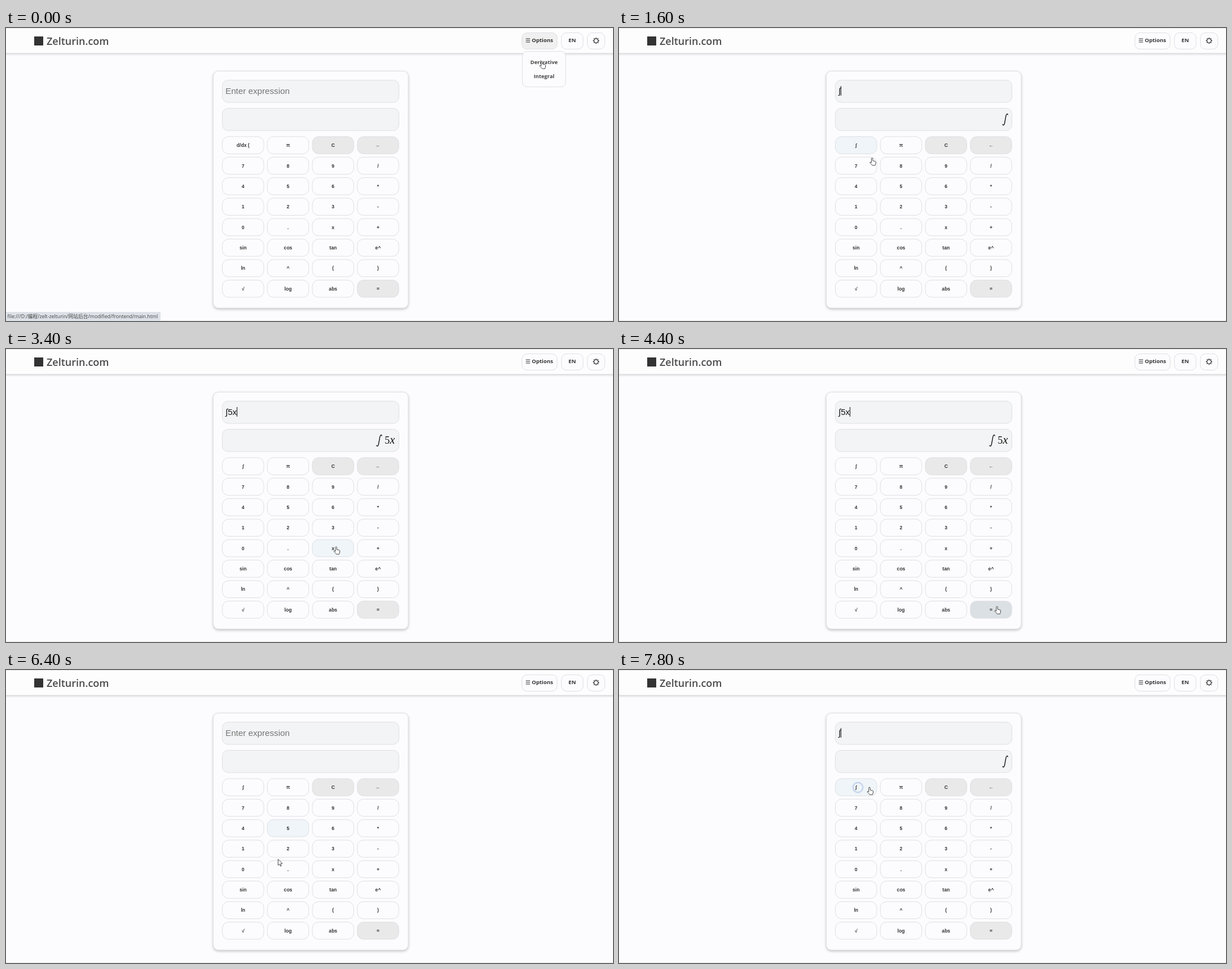
An HTML page with a canvas for the animation above (8 s loop, 1076 by 520 pixels).

```html
<!DOCTYPE html>
<html lang="en">
<head>
<meta charset="utf-8">
<title>Calculator</title>
<style>
  html, body { margin: 0; width: 100%; height: 100%; overflow: hidden; background: #fcfcfe; }
  canvas { display: block; width: 100%; height: 100%; }
</style>
</head>
<body>
<canvas id="stage" width="1076" height="520"></canvas>
<script>
const ctx = document.getElementById('stage').getContext('2d');
const LOOP = 8000, STEP = 200;
const UI = '"Open Sans", "Noto Sans", "Noto Sans CJK SC", sans-serif';
const SANS = '"Liberation Sans", Arial, sans-serif';
const SERIF = '"Liberation Serif", "Times New Roman", serif';
const PAGE = '#fcfcfe', BORDER = '#dfdfe5', INK = '#333';

const STATUS = ['file:', '', '', 'D:', '编程', 'zelt-zelturin', '网站后台',
  'modified', 'frontend', 'main.html'].join('/');

const KEYS = [
  'd/dx (', 'π', 'C', '←',
  '7', '8', '9', '/',
  '4', '5', '6', '*',
  '1', '2', '3', '-',
  '0', '.', 'x', '+',
  'sin', 'cos', 'tan', 'e^',
  'ln', '^', '(', ')',
  '√', 'log', 'abs', '='
];
const GREY = ['C', '←', '='];

// Pointer tip: time, x, y
const TRACK = [
  [0, 950, 59], [400, 953, 81], [800, 682, 170], [1200, 424, 206], [1400, 424, 207],
  [2000, 498, 278], [2200, 566, 284], [2400, 609, 298], [2800, 583, 348], [3600, 586, 352],
  [4200, 667, 456], [4400, 670, 457], [4600, 672, 457], [4800, 783, 418], [5000, 784, 372],
  [5200, 612, 216], [5600, 571, 211], [6000, 571, 211], [6600, 438, 398], [6800, 424, 422],
  [7000, 440, 421], [7200, 480, 417], [7400, 458, 318], [7600, 424, 207], [7800, 444, 208]
];

// Typed expression by time
const TYPED = [[0, ''], [1400, '∫'], [2000, '∫5'], [3000, '∫5x'], [6000, ''], [7600, '∫']];
const PAGE_SWITCH = 600, SOLVED = 4600, CLEARED = 6000, RING = 7800;

const lastBefore = (list, t) => list.filter(k => k[0] <= t).pop();

function pointerAt(t) {
  const a = lastBefore(TRACK, t);
  const b = TRACK.find(k => k[0] > t) || a;
  const u = a === b ? 0 : (t - a[0]) / (b[0] - a[0]);
  return [a[1] + (b[1] - a[1]) * u, a[2] + (b[2] - a[2]) * u];
}

const keyBox = i => [383.5 + (i % 4) * 79.75, 192.8 + Math.floor(i / 4) * 36.37, 73.5, 30.5];

function keyUnder(t) {
  if (t < 0) return -1;
  const [px, py] = pointerAt(t);
  return KEYS.findIndex((_, i) => {
    const [x, y, w, h] = keyBox(i);
    return px >= x && px <= x + w && py >= y && py <= y + h;
  });
}

function text(str, x, y, font, color = INK, align = 'left') {
  ctx.font = font;
  ctx.fillStyle = color;
  ctx.textAlign = align;
  ctx.fillText(str, x, y);
}

function rect(x, y, w, h, color) {
  ctx.fillStyle = color;
  ctx.fillRect(x, y, w, h);
}

function panel(x, y, w, h, r, fill, shadow) {
  ctx.beginPath();
  ctx.roundRect(x, y, w, h, r);
  ctx.save();
  if (shadow) {
    ctx.shadowColor = `rgba(0,0,0,${shadow})`;
    ctx.shadowBlur = 5;
    ctx.shadowOffsetY = 2;
  }
  ctx.fillStyle = fill;
  ctx.fill();
  ctx.restore();
  ctx.strokeStyle = BORDER;
  ctx.lineWidth = 1;
  ctx.stroke();
}

function shape(d, x, y, fill, stroke, width) {
  const path = new Path2D(d);
  ctx.save();
  ctx.translate(x, y);
  if (fill) {
    ctx.fillStyle = fill;
    ctx.fill(path);
  }
  ctx.strokeStyle = stroke;
  ctx.lineWidth = width;
  ctx.lineCap = ctx.lineJoin = 'round';
  ctx.stroke(path);
  ctx.restore();
}

function drawGear(x, y) {
  ctx.strokeStyle = INK;
  ctx.lineWidth = 1.2;
  ctx.beginPath();
  ctx.arc(x, y, 3.7, 0, 7);
  ctx.stroke();
  ctx.lineWidth = 1.5;
  ctx.beginPath();
  for (let i = 0; i < 8; i++) {
    const a = i * Math.PI / 4, c = Math.cos(a), s = Math.sin(a);
    ctx.moveTo(x + c * 4, y + s * 4);
    ctx.lineTo(x + c * 5.6, y + s * 5.6);
  }
  ctx.stroke();
}

function drawHeader(menuOpen) {
  ctx.save();
  ctx.shadowColor = 'rgba(0,0,0,0.2)';
  ctx.shadowBlur = 4;
  ctx.shadowOffsetY = 1.5;
  rect(-10, 0, 1096, 44.5, '#fdfdfe');
  ctx.restore();
  rect(0, 0, 1076, 1, '#e6e6e8');
  rect(50, 15, 16, 16, INK);
  text('Zelturin.com', 72, 30, `600 18px ${UI}`, '#4a4a4a');

  const bold = `bold 9.6px ${UI}`;
  panel(914.5, 8.5, 62.5, 29, 9, menuOpen ? '#f0f0f0' : PAGE);
  for (const y of [18.5, 21.5, 24.5]) rect(921.5, y, 7.5, 1, INK);
  text('Options', 932, 25.2, bold);
  panel(984.5, 8.5, 38.5, 29, 9, PAGE);
  text('EN', 1003.7, 25.2, bold, INK, 'center');
  panel(1030.5, 8.5, 31, 29, 9, PAGE);
  drawGear(1046, 22.5);

  if (menuOpen) {
    panel(915.5, 41.5, 76.5, 63, 8, PAGE);
    const item = `bold 9.4px ${UI}`;
    text('Derivative', 953.8, 64, item, '#444', 'center');
    text('Integral', 953.8, 89.4, item, '#444', 'center');
  }
}

const integral = x => shape(
  'M.6,8.8C1.5,11 3.3,10.2 4,6.2L6.1,-5.4C6.9,-10.2 9,-11 9.6,-8.6',
  x, 162.4, null, '#111', 1.4);

function drawMath(expr, solved) {
  const roman = `18px ${SERIF}`, italic = `italic 20px ${SERIF}`;
  const put = (s, x, font = roman, y = 168) => text(s, x, y, font, '#111');
  if (solved) {
    put('(', 614.8);
    put('5', 621.2);
    put('/', 632);
    put('2', 639);
    put(')', 648.8);
    put('∗', 659.5);
    put('x', 673, italic);
    put('2', 683.6, `12.6px ${SERIF}`, 161);
  } else if (expr === '∫') {
    integral(679.6);
  } else if (expr === '∫5') {
    integral(667);
    put('5', 681.4);
  } else if (expr === '∫5x') {
    integral(656.5);
    put('5', 671.2);
    put('x', 680.4, italic);
  }
}

function drawFields(expr, solved) {
  panel(383.5, 92.5, 313, 39.5, 10, '#f2f4f5');
  panel(383.5, 142.5, 313, 39.5, 10, '#f2f4f5');
  const font = `15.2px ${SANS}`;
  if (expr) {
    text(expr, 389, 117, font, '#111');
    if (!solved) rect(Math.round(389 + ctx.measureText(expr).width), 103, 1, 17, '#111');
  } else {
    text('Enter expression', 389, 117, font, '#757575');
  }
  drawMath(expr, solved);
}

function keyColor(label, i, t) {
  const grey = GREY.includes(label);
  // The hover tint trails the pointer by one step
  if (keyUnder(t - STEP) !== i) return grey ? '#e9e9e9' : PAGE;
  if (!grey) return '#eff5f8';
  return keyUnder(t - 2 * STEP) === i ? '#d0d4d9' : '#dae0e3';
}

function drawKeys(t) {
  KEYS.forEach((key, i) => {
    const [x, y, w, h] = keyBox(i);
    const label = i === 0 && t >= PAGE_SWITCH ? '∫' : key;
    panel(x, y, w, h, 11, keyColor(key, i, t));
    text(label, x + w / 2, y + 18.4, `bold 8.6px ${SANS}`, INK, 'center');
  });
}

function drawRing(x, y) {
  ctx.beginPath();
  ctx.arc(x, y, 8.8, 0, 7);
  ctx.strokeStyle = 'rgba(185,200,235,0.75)';
  ctx.lineWidth = 2.4;
  ctx.stroke();
}

function drawPointer(t) {
  const [x, y] = pointerAt(t);
  if (t < PAGE_SWITCH || keyUnder(t) >= 0) {
    shape('M-1.2,8V1.2Q-1.2,0 0,0Q1.2,0 1.2,1.2V5L5.3,5.9Q6.8,6.4 6.6,8L6,11.2L5.3,13.2H.4L-1,11.4' +
      'L-3.9,8.4Q-3.9,6.8 -2.4,7.2Z', x, y, '#fff', '#333', 0.9);
  } else {
    shape('M0,.5V11L2.5,8.9L4.2,12.6L5.8,11.9L4.2,8.3L7.2,7.9Z', x, y, '#fff', '#333', 0.9);
  }
}

function draw(t) {
  const menuOpen = t < PAGE_SWITCH;
  const solved = t >= SOLVED && t < CLEARED;
  rect(0, 0, 1076, 520, PAGE);
  drawHeader(menuOpen);
  panel(367.5, 76.5, 345.5, 420.5, 9, PAGE, 0.25);
  drawFields(lastBefore(TYPED, t)[1], solved);
  drawKeys(t);
  rect(0, 519, 1076, 1, '#e6e6e8');
  if (menuOpen) {
    rect(0, 504, 274, 16, '#dde2e8');
    text(STATUS, 2.5, 515.3, `8.75px ${UI}`, '#444');
  }
  if (t >= RING) drawRing(423.5, 208.5);
  drawPointer(t);
}

function tick(now) {
  draw(Math.floor((now % LOOP) / STEP) * STEP);
  requestAnimationFrame(tick);
}
draw(0);
requestAnimationFrame(tick);
</script>
</body>
</html>
```
